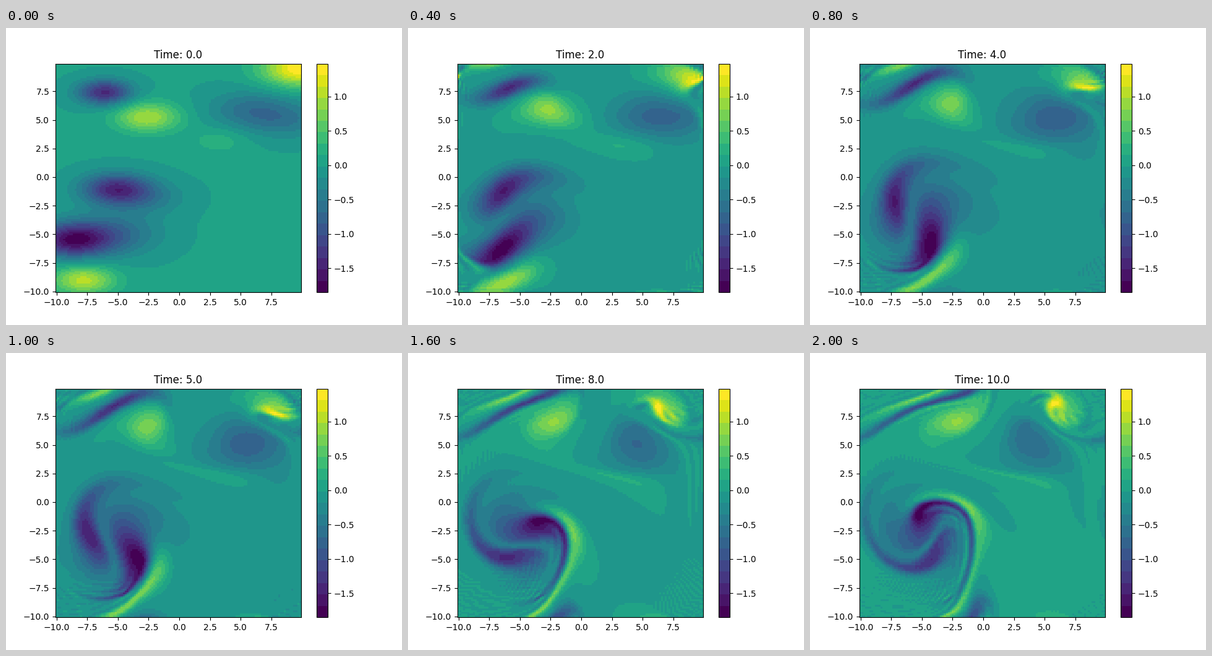
These frames come from a looping animation (640x480 px, 2200 ms). A matplotlib script:

```python
import numpy as np
import matplotlib.pyplot as plt
from matplotlib.animation import FuncAnimation
from matplotlib.cm import ScalarMappable
from matplotlib.colors import Normalize

N = 128
SIZE = 20.0
NU = 0.001
STEPS = 40          # integration steps per unit of time
FRAMES = 11
STRETCH = 4         # squared aspect ratio shared by all vortices

# x, y, strength, squared height
VORTICES = [
    (-6.05, 7.4, -1.4, 1.2),
    (-2.6, 5.25, 0.98, 1.7),
    (3.3, 3.2, 0.25, 1.4),
    (5.7, 5.9, -0.55, 2.8),
    (8.8, 5.0, -0.45, 2.6),
    (9.9, 9.5, 1.48, 2.5),
    (-5.2, -1.05, -1.38, 1.9),
    (-2.5, -1.8, -0.4, 2.2),
    (-8.8, -5.5, -1.55, 2.2),
    (-5.4, -5.0, -0.7, 3.3),
    (-7.8, -9.0, 1.05, 1.6),
]

dx = SIZE / N
axis = np.arange(N) * dx - SIZE / 2
X, Y = np.meshgrid(axis, axis)
freq = 2 * np.pi * np.fft.fftfreq(N, dx)
KX, KY = np.meshgrid(freq, freq)
K2 = KX**2 + KY**2
K2[0, 0] = 1


def vortex(x, y, strength, h):
    return strength * np.exp(-((X - x)**2 / STRETCH + (Y - y)**2) / h)


def ddx(f):
    return (np.roll(f, -1, 1) - np.roll(f, 1, 1)) / (2 * dx)


def ddy(f):
    return (np.roll(f, -1, 0) - np.roll(f, 1, 0)) / (2 * dx)


def laplacian(f):
    near = sum(np.roll(f, s, a) for s in (1, -1) for a in (0, 1))
    return (near - 4 * f) / dx**2


def rate(w):
    w_hat = np.fft.fft2(w)
    w_hat[0, 0] = 0
    psi = np.real(np.fft.ifft2(-w_hat / K2))
    return ddx(psi) * ddy(w) - ddy(psi) * ddx(w) + NU * laplacian(w)


def advance(w):
    h = 1 / STEPS
    for _ in range(STEPS):
        a = rate(w)
        b = rate(w + h / 2 * a)
        c = rate(w + h / 2 * b)
        d = rate(w + h * c)
        w = w + h / 6 * (a + 2 * b + 2 * c + d)
    return w


fields = [sum(vortex(*v) for v in VORTICES)]
while len(fields) < FRAMES:
    fields.append(advance(fields[-1]))

fig, ax = plt.subplots(figsize=(6.4, 4.8), dpi=100)
cmap = plt.get_cmap("viridis", 20)
mesh = ax.pcolormesh(X, Y, fields[0], cmap=cmap, shading="nearest")
scale = Normalize(fields[0].min(), fields[0].max())
fig.colorbar(ScalarMappable(scale, cmap), ax=ax)
title = ax.set_title("")


def draw(i):
    w = fields[i]
    mesh.set_array(w)
    mesh.set_clim(w.min(), w.max())
    title.set_text(f"Time: {i:.1f}")
    return mesh, title


anim = FuncAnimation(fig, draw, frames=FRAMES, interval=200, repeat=True)
plt.show()
```
